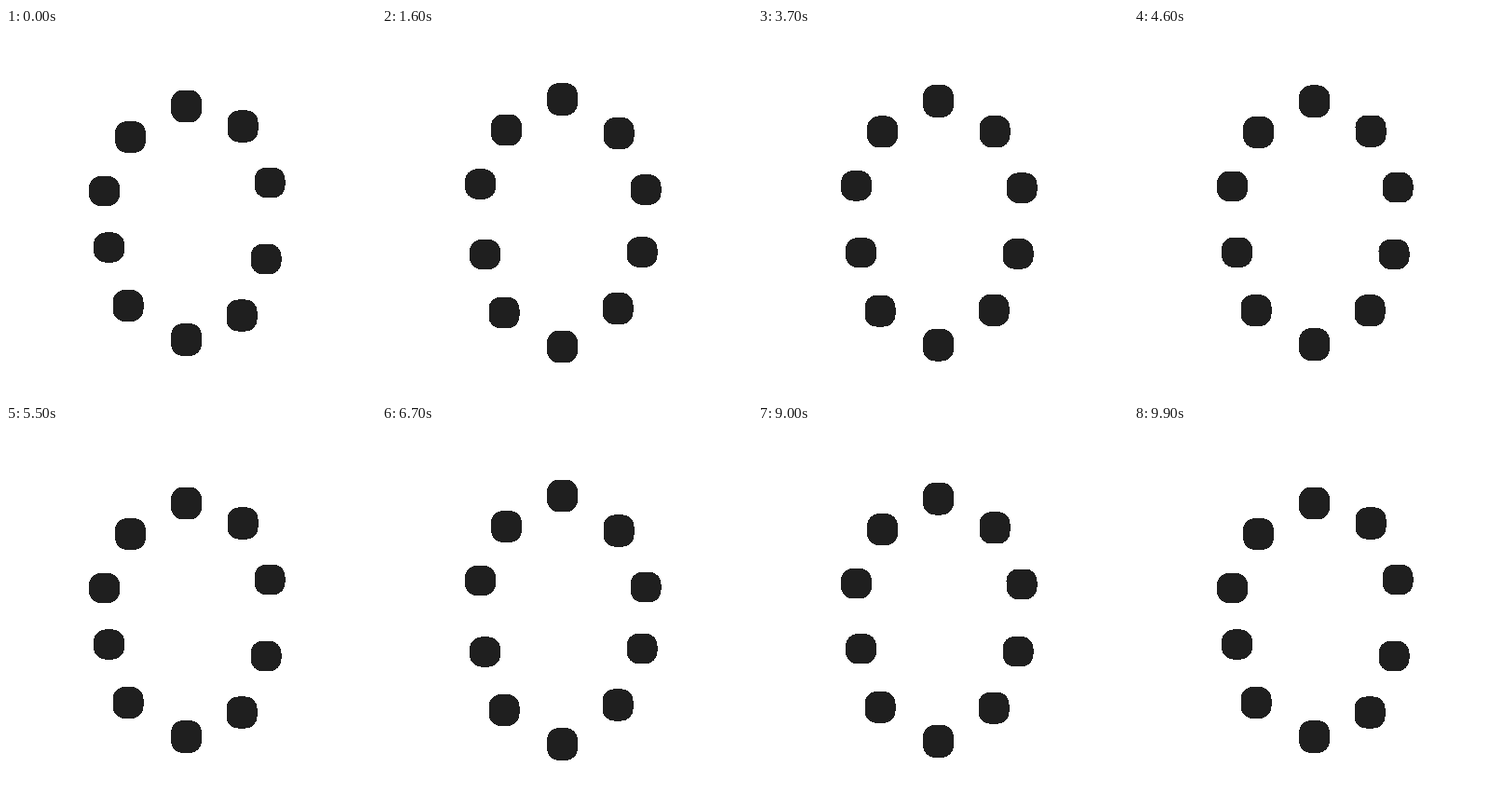
These frames come from a looping animation (397 px wide and 396 px high, 10000 ms). An HTML page:

```html
<!DOCTYPE html>
<html lang="en">
<head>
<meta charset="utf-8">
<title>Ring of dots</title>
<style>
  html, body { margin: 0; width: 100%; height: 100%; overflow: hidden; background: #fff; }
  svg { display: block; width: 397px; height: 396px; }
  rect { fill: #1f1f1f; shape-rendering: crispEdges; }
</style>
</head>
<body>
<svg viewBox="0 0 397 396">
  <g id="rising"></g>
  <g id="falling"></g>
</svg>
<script>
const LOOP = 10000, STEP = 100;
const MID_X = 200, MID_Y = 209, RADIUS = 125;
const rising = document.getElementById('rising');
const falling = document.getElementById('falling');

// Resting centres, counterclockwise from the top
const centres = [
  [193.5, 84], [133.5, 117], [105.5, 175], [110.5, 235.5], [131, 298],
  [193.5, 334.5], [253, 308.5], [279, 248], [283, 166], [254, 105.5]
];

// Dots grow taller towards the top and bottom of the ring
function addDot([x, y]) {
  const width = 33;
  const height = 31.5 + 3.3 * Math.abs(y - MID_Y) / RADIUS;
  const dot = document.createElementNS('http://www.w3.org/2000/svg', 'rect');
  const attrs = { x: x - width / 2, y: y - height / 2, width, height, rx: 13 };
  for (const name in attrs) dot.setAttribute(name, attrs[name]);

  // Opposite quadrants move together
  const rises = (x < MID_X) === (y < MID_Y);
  (rises ? rising : falling).append(dot);
}
centres.forEach(addDot);

// Quick rise, slower fall: three swings every eleven steps, slowly fading
function offset(step) {
  const phase = (step * 3 % 11) / 11;
  const fade = 1 - 0.0012 * step;
  return fade * (phase < 0.2 ? 65 * phase : 12 * (1 - phase));
}

function draw(time) {
  const step = Math.floor(time % LOOP / STEP);
  const d = offset(step);
  rising.setAttribute('transform', `translate(0 ${-d})`);
  falling.setAttribute('transform', `translate(0 ${d})`);
}

let start;
function tick(now) {
  start ??= now;
  draw(now - start);
  requestAnimationFrame(tick);
}
draw(0);
requestAnimationFrame(tick);
</script>
</body>
</html>
```
